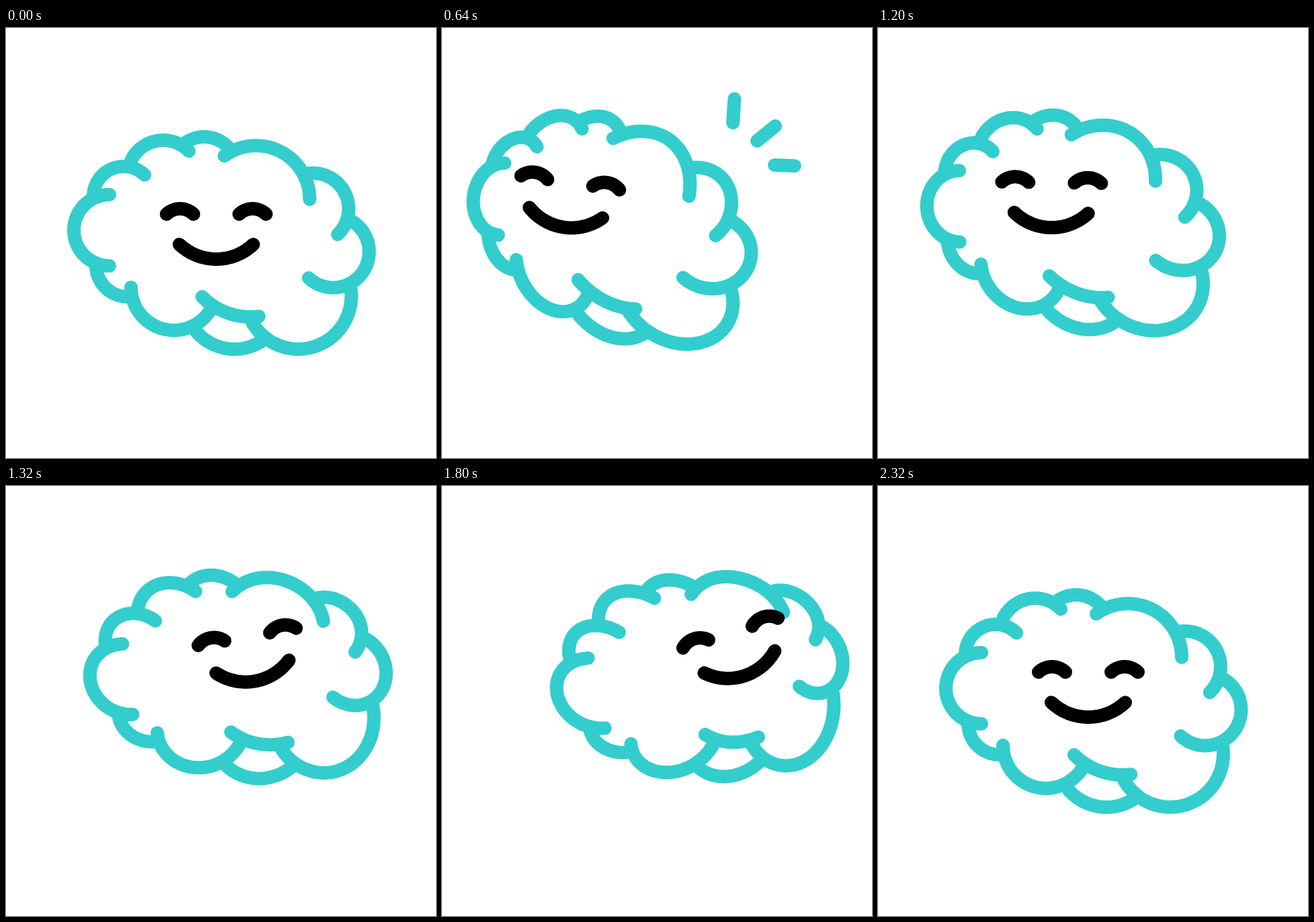
An HTML page that plays this animation: 640 px wide and 640 px high, repeating every 2.4 s.

```html
<!DOCTYPE html>
<html lang="en">
<head>
<meta charset="utf-8">
<title>Happy cloud</title>
<style>
  html, body { margin: 0; width: 100%; height: 100%; overflow: hidden; background: #fff; }
  svg { display: block; width: 100%; height: 100%; }
  path { fill: none; stroke: #33cdcd; stroke-width: 20; stroke-linecap: round; stroke-linejoin: round; }
  .face { stroke: #000; }
</style>
</head>
<body>
<svg id="stage" viewBox="0 0 640 640"></svg>
<script>
const LOOP = 2400;
const STEPS = 28;
const RAD = Math.PI / 180;

// Resting cloud and face as arcs: cx, cy, r, start and end angle.
const LOBES = [
  [154, 301, 53, -90, -270], [175, 251, 45, -46, -180], [234, 220, 53, -154, -44],
  [295, 211, 49, -127, -39], [372, 255, 80, -126, 0], [457, 269, 53, -98, 46],
  [487, 333, 53.5, -58, 133], [435, 399, 79, -8, 153], [364, 328, 102, 135, 83],
  [340, 403, 75, 140, 56], [250, 386, 64, 180, 32], [181, 353, 47, 180, 88]
];
const FACE = [[259, 298, 29, -133.6, -46.4], [367, 298, 29, -133.6, -46.4], [313, 264, 80, 133.4, 46.6]];
const EYES = { x: 313, y: 277 };

// Pose: cloud shift, shear, tilt and squeeze; face shift and turn in degrees.
const REST  = { x: 0,   y: 0,   shear: 0,  tilt: 0,   squeeze: 0,  fx: 0,    fy: 0,   turn: 0 };
const LEFT  = { x: -95, y: -23, shear: -8, tilt: 45,  squeeze: 5,  fx: -123, fy: -47, turn: 8.2 };
const RIGHT = { x: 92,  y: -36, shear: 34, tilt: -82, squeeze: -9, fx: 120,  fy: -61, turn: -18 };

// Each leg bends off the straight line by its lifts for cloud and face.
const LEGS = [
  { t0: 0,    t1: 700,  ease: [0.93, 0.38], from: REST,  to: LEFT,  lift: 0,  faceLift: 0 },
  { t0: 890,  t1: 1640, ease: [0.65, 0.35], from: LEFT,  to: RIGHT, lift: -5, faceLift: 5 },
  { t0: 1640, t1: 2320, ease: [0.92, 0.11], from: RIGHT, to: REST,  lift: 2,  faceLift: 8 }
];

// Sparks: inner and outer end.
const SPARKS = [[433, 141, 437, 78], [469, 168, 517, 129], [495, 204, 548, 206]];

const mix = (a, b, p) => a + (b - a) * p;

// Cubic easing with handles (x1, 0) and (x2, 1).
function ease(x, x1, x2) {
  if (x <= 0 || x >= 1) return x <= 0 ? 0 : 1;
  let lo = 0, hi = 1, u;
  for (let i = 0; i < 24; i++) {
    u = (lo + hi) / 2;
    const w = 1 - u;
    if (3 * w * w * u * x1 + 3 * w * u * u * x2 + u * u * u < x) lo = u; else hi = u;
  }
  return u * u * (3 - 2 * u);
}
const progress = (t, t0, t1, [x1, x2]) => ease((t - t0) / (t1 - t0), x1, x2);

function poseAt(t) {
  const { t0, t1, ease: handles, from, to, lift, faceLift } = LEGS.filter(l => t >= l.t0).pop();
  const p = progress(t, t0, t1, handles);
  const pose = {};
  for (const key in from) pose[key] = mix(from[key], to[key], p);
  const bump = 4 * p * (1 - p);
  pose.y += bump * lift;
  pose.fy += bump * faceLift;
  return pose;
}

// The cloud leans like a dome: its middle travels further than its rim.
function bendCloud(x, y, pose) {
  const u = (x - 320) / 230, v = (y - 320) / 165, rim = u * u + v * v;
  const narrow = 13 * (pose.x / 95) ** 2;
  return [
    x + pose.x * (1 - 0.31 * rim) + pose.shear * v - narrow * u,
    y + pose.y + pose.tilt * u * (1 - 0.45 * rim) + pose.squeeze * v
  ];
}

// The face moves rigidly, turning about the point between the eyes.
function moveFace(x, y, pose) {
  const c = Math.cos(pose.turn * RAD), s = Math.sin(pose.turn * RAD);
  const dx = x - EYES.x, dy = y - EYES.y;
  return [EYES.x + pose.fx + c * dx - s * dy, EYES.y + pose.fy + s * dx + c * dy];
}

function arcPath([cx, cy, r, a0, a1], move, pose) {
  const pts = [];
  for (let i = 0; i <= STEPS; i++) {
    const a = mix(a0, a1, i / STEPS) * RAD;
    const [x, y] = move(cx + r * Math.cos(a), cy + r * Math.sin(a), pose);
    pts.push(`${x.toFixed(2)} ${y.toFixed(2)}`);
  }
  return "M" + pts.join("L");
}

const stage = document.getElementById("stage");
function addPath(cls) {
  const el = document.createElementNS("http://www.w3.org/2000/svg", "path");
  el.setAttribute("class", cls);
  return stage.appendChild(el);
}
const lobes = LOBES.map(() => addPath("cloud"));
const face = FACE.map(() => addPath("face"));
const sparks = SPARKS.map(() => addPath("spark"));

function draw(t) {
  const pose = poseAt(t);
  lobes.forEach((el, i) => el.setAttribute("d", arcPath(LOBES[i], bendCloud, pose)));
  face.forEach((el, i) => el.setAttribute("d", arcPath(FACE[i], moveFace, pose)));

  const tip = progress(t, 555, 715, [0.4, 0.6]);
  const tail = progress(t, 690, 890, [0.4, 0.6]);
  sparks.forEach((el, i) => {
    const [x0, y0, x1, y1] = SPARKS[i];
    const at = q => `${mix(x0, x1, q).toFixed(2)} ${mix(y0, y1, q).toFixed(2)}`;
    el.setAttribute("d", tip > tail ? `M${at(tail)}L${at(tip)}` : "");
  });
}

const start = performance.now();
function tick() {
  draw((performance.now() - start) % LOOP);
  requestAnimationFrame(tick);
}
tick();
</script>
</body>
</html>
```
